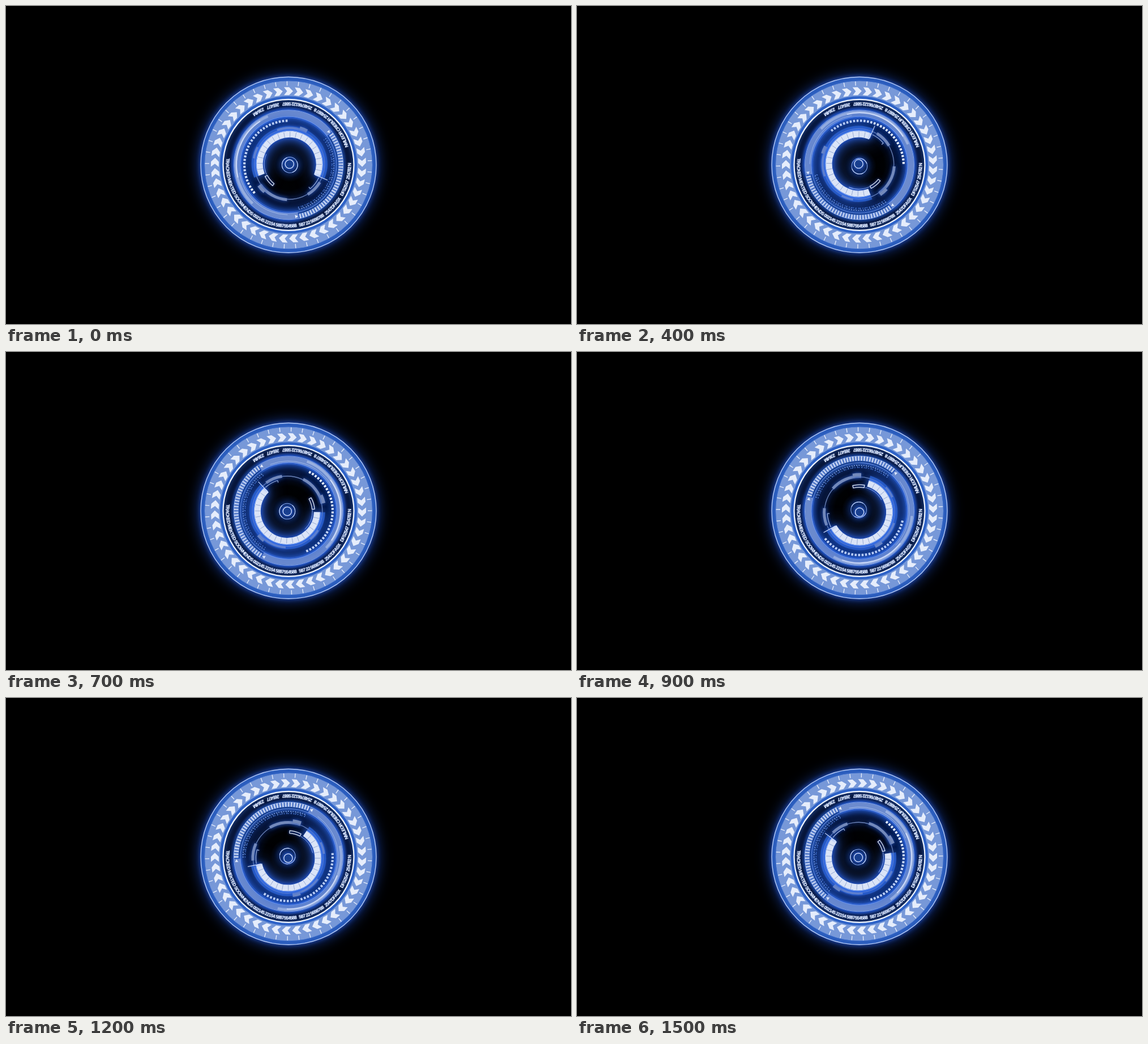
Recreate the animation shown at these times as an HTML page with a canvas. Size 998 by 561 pixels, loop 1.7 s.

```html
<!DOCTYPE html>
<html lang="en">
<head>
<meta charset="utf-8">
<title>HUD dial</title>
<style>
html, body { margin: 0; width: 100%; height: 100%; overflow: hidden; background: #000; }
canvas { display: block; }
</style>
</head>
<body>
<canvas id="stage" width="998" height="561"></canvas>
<script>
const ctx = document.getElementById('stage').getContext('2d');
const CX = 499, CY = 280.3, LOOP = 1700, STEP = 100, LAST = 15;

const LABELS = [
  ['TRACKED MEKTED SOOWHENDS 002145 22154', 186],
  ['5887554588', 102], ['587 22 5698788', 80], ['2547DFASX', 53],
  ['DFS2547', 30], ['254782 N', 13.5], ['NMLEOR CREBUR 254887 8', -17],
  ['2548766122 5887', -67.5], ['265477', -99], ['2364M', -114]
];

const rad = deg => deg * Math.PI / 180;
const clamp = (v, lo, hi) => Math.min(hi, Math.max(lo, v));

// The clock runs faster for three steps after the seventh
const clock = n => n + 2 * clamp((n - 7) / 3, 0, 1);

// Angles in degrees, clockwise from the right
const arrowAngle = s => -1 + 1.55 * s;
const dialAngle = s => Math.min(21 + 22.5 * s, 277.5 - 16 * (s - 11.4));

function arc(r, from, to, width, color) {
  ctx.beginPath();
  ctx.arc(0, 0, r, rad(from), rad(to));
  ctx.lineWidth = width;
  ctx.strokeStyle = color;
  ctx.stroke();
}

const circle = (r, width, color) => arc(r, 0, 360, width, color);

function disc(r, fill) {
  ctx.beginPath();
  ctx.arc(0, 0, r, 0, Math.PI * 2);
  ctx.fillStyle = fill;
  ctx.fill();
}

function radial(r, stops) {
  const g = ctx.createRadialGradient(0, 0, 0, 0, 0, r);
  stops.forEach(([p, color]) => g.addColorStop(p, color));
  return g;
}

function glow(blur, color = '#2f6cff') {
  ctx.shadowBlur = blur;
  ctx.shadowColor = blur ? color : 'transparent';
}

function spoke(deg, r0, r1, width, color) {
  const c = Math.cos(rad(deg)), s = Math.sin(rad(deg));
  ctx.beginPath();
  ctx.moveTo(c * r0, s * r0);
  ctx.lineTo(c * r1, s * r1);
  ctx.lineWidth = width;
  ctx.strokeStyle = color;
  ctx.stroke();
}

// Runs draw() with x along the clockwise tangent and y towards the centre
function at(deg, r, draw) {
  ctx.save();
  ctx.rotate(rad(deg + 90));
  ctx.translate(0, -r);
  draw();
  ctx.restore();
}

function polygon(points, fill) {
  ctx.beginPath();
  points.forEach(([x, y]) => ctx.lineTo(x, y));
  ctx.closePath();
  ctx.fillStyle = fill;
  ctx.fill();
}

function group(x, y, deg, draw) {
  ctx.save();
  ctx.translate(x, y);
  ctx.rotate(rad(deg));
  draw();
  ctx.restore();
}

function drawRim(phase) {
  glow(27, '#1d49b8');
  disc(155, '#2b5dbd');
  glow(9, '#2352c4');
  disc(155, '#2b5dbd');
  glow(0);
  circle(134.5, 27, '#7798d8');
  circle(155, 1.4, '#b4caf6');
  circle(148.5, 0.8, '#3f70cf');
  for (let i = 0; i < 45; i++) {
    const a = i * 8 - 90 + phase;
    spoke(a, 140, 147.5, 1.4, '#e3ebfb');
    at(a + 1, 130, () => polygon(
      [[-8, -7], [1, -7], [8, 0], [1, 7], [-8, 7], [-2.5, 0]], '#e6edfb'));
  }
}

function drawPlate() {
  disc(115, radial(115, [
    [0, '#000'], [.38, '#000103'], [.54, '#040d26'], [.64, '#081a46'], [.72, '#123479'],
    [.8, '#1d4ca6'], [.85, '#173f90'], [.9, '#08163c'], [1, '#071433']]));
  glow(7, '#3f80ff');
  circle(115.5, 2.2, '#f2f7ff');
  glow(0);
}

function drawLabels() {
  const base = 110.4, tracking = -0.85;
  ctx.font = 'bold 8.2px "Liberation Sans", Arial, sans-serif';
  ctx.textAlign = 'center';
  ctx.textBaseline = 'alphabetic';
  ctx.fillStyle = '#fff';
  glow(2, '#6fa0ff');
  for (const [text, start] of LABELS) {
    let a = start;
    for (const ch of text) {
      const half = (ctx.measureText(ch).width + tracking) / 216 * 180 / Math.PI;
      a -= half;
      ctx.save();
      ctx.rotate(rad(a - 90));
      ctx.fillText(ch, 0, base);
      ctx.restore();
      a -= half;
    }
  }
  glow(0);
}

function drawDial() {
  glow(12);
  arc(90.5, 58, 302, 11, '#6c8bce');
  glow(0);
  arc(92.5, -57, 57, 9, '#4a72c4');
  circle(96.5, 0.9, '#8caaea');
  circle(85, 1.1, '#6c98f5');
  circle(82.8, 0.7, '#3c70dd');
  arc(93, 112, 226, 4.5, '#9ab1e0');
  arc(92, 145, 216, 1.8, '#dce6fb');
  arc(88, 70, 150, 0.8, '#a9c0f0');
  for (let i = 0; i < 37; i++) {
    spoke(-56 + i * 112 / 36, 88.5, 96.5, 2.7, '#c5d3f1');
  }
  for (const side of [-1, 1]) {
    at(side * 60, 92, () => polygon(
      [[-side * 2.5, 0], [side * 2.5, -3], [side * 2.5, 3]], '#e4ecfc'));
  }
  for (let i = 0; i < 38; i++) {
    const a = -56 + i * 3;
    spoke(a, 79.5, 81.2, 2, '#7da1ec');
    spoke(a + (i % 3) * .5, 75.8, 77.4, 1.5, '#4a79d8');
    if (i % 2) spoke(a + 1, 76, 80, 0.6, '#7097e3');
  }
  glow(14, '#2f70ff');
  for (let i = 0; i < 29; i++) {
    spoke(120.5 + i * 4.5, 75.8, 80, 3.6, '#eef4ff');
  }
  glow(0);
}

function drawGauge() {
  const metal = '#7389bb';
  glow(34, '#2c63dc');
  arc(57, -224, 0, 20, '#2656b4');
  glow(7, '#2454c0');
  circle(62, 1.3, '#6b83b8');
  arc(63, -133, -85, 5, metal);
  arc(66, -97, -85, 6, metal);
  arc(63, 71, 122, 5, metal);
  arc(66, 109, 122, 6, metal);
  arc(62.5, 8, 36, 5, metal);
  arc(63, 166, 185, 5, metal);

  glow(13, '#2f6cff');
  arc(60, -223, -3, 3, '#3469d2');
  arc(52.5, -224, 0, 11, '#dbe4f7');
  glow(0);
  arc(58.5, -224, 0, 1, '#86a8ef');
  for (let i = 1; i < 20; i++) spoke(-224 + i * 11.2, 47.5, 57, 0.7, '#8198c9');

  glow(4);
  spoke(0, 49, 73, 1.1, '#d7e4ff');
  arc(57, 2, 27, 1, '#b9cdf6');
  spoke(27, 53, 57, 1, '#b9cdf6');
  arc(44.5, 132, 180, 0.9, '#8aaaf0');

  ctx.beginPath();
  ctx.arc(0, 0, 48.5, rad(105), rad(130));
  ctx.arc(0, 0, 44, rad(130), rad(105), true);
  ctx.closePath();
  ctx.lineJoin = 'round';
  ctx.lineWidth = 1.2;
  ctx.strokeStyle = '#eaf1ff';
  ctx.stroke();
  glow(0);
}

function drawHub() {
  disc(30, radial(30, [[0, '#14357ae6'], [.45, '#0f2a66b0'], [1, '#0a1c4800']]));
  glow(10, '#2a62e8');
  circle(13.8, 1, '#8fb0f5');
  arc(13.8, -50, 50, 1.2, '#c3d5fb');
  arc(13.8, 130, 230, 1.2, '#c3d5fb');
  glow(0);
}

function drawEye() {
  glow(7);
  disc(7.6, '#173a80');
  circle(7.6, 1.3, '#d5e2ff');
  glow(0);
}

function drawStep(n) {
  const s = clock(n);
  const dial = dialAngle(s);
  const pin = 404 - dial;
  const orbit = deg => [2.3 * Math.cos(rad(deg)), 2.3 * Math.sin(rad(deg))];
  const hub = orbit(dial - 18), eye = orbit(pin - 63);

  ctx.fillStyle = '#000';
  ctx.fillRect(0, 0, 998, 561);
  ctx.save();
  ctx.translate(CX, CY);
  drawRim(arrowAngle(s));
  drawPlate();
  drawLabels();
  group(0, 0, dial, drawDial);
  group(...eye, pin, drawGauge);
  group(...hub, dial, drawHub);
  group(...eye, pin, drawEye);
  ctx.restore();
}

let shown = -1;
const began = performance.now();

function tick() {
  const n = Math.min(LAST, Math.floor((performance.now() - began) % LOOP / STEP));
  if (n !== shown) drawStep(shown = n);
  requestAnimationFrame(tick);
}
tick();
</script>
</body>
</html>
```
